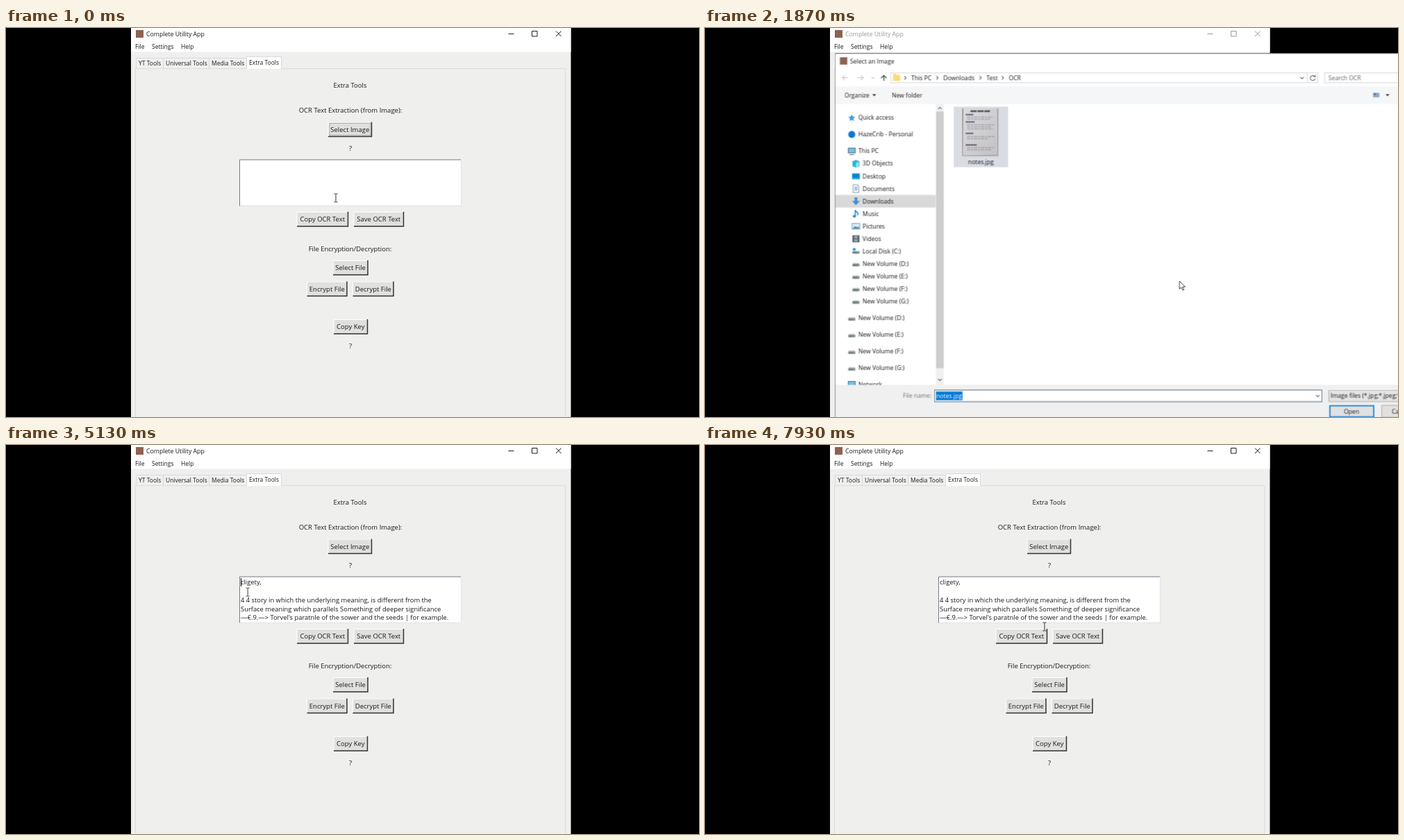
An HTML page that plays this animation: 998 px wide and 561 px high, repeating every 8 s.

```html
<!DOCTYPE html>
<html lang="en">
<head>
<meta charset="utf-8">
<title>Complete Utility App</title>
<style>
  html, body { margin: 0; width: 100%; height: 100%; overflow: hidden; background: #000; }
  svg { display: block; }
  #stage { width: 100%; height: 100%; font-family: "Open Sans", "Noto Sans", sans-serif; }
  text { fill: currentColor; white-space: pre; }
  #stage { color: #1a1a1a; }
  .anim { animation: 8s linear infinite; }
  .step { animation: 8s step-end infinite; }

  #titlebar { animation-name: titlebar; }
  #focusRing { animation-name: ring; }
  #result { animation-name: result; }
  #caret { animation-name: caret; }
  #scroller { animation-name: scroll; }
  #selection { animation-name: select; }
  #dialog { animation-name: dialog; transform-origin: 613px 300px; }
  #picked, #openPressed { animation-name: picked; }
  #openPressed { animation-name: pressed; }
  #pointer { animation-name: pointer; }
  #arrow { animation-name: arrow; }
  #beam { animation-name: beam; }

  @keyframes titlebar { 0%, 34.2%, 100% { color: #1a1a1a } 10.4% { color: #999 } }
  @keyframes ring { 0% { opacity: 1 } 62.5%, 100% { opacity: 0 } }
  @keyframes result { 0% { opacity: 0 } 50%, 100% { opacity: 1 } }
  @keyframes caret { 0%, 66%, 100% { opacity: 0 } 62.5% { opacity: 1 } }
  @keyframes picked { 0%, 36.5%, 100% { opacity: 0 } 14.8% { opacity: 1 } }
  @keyframes pressed { 0%, 36.5%, 100% { opacity: 0 } 28% { opacity: 1 } }
  @keyframes arrow { 0%, 57.7%, 100% { opacity: 0 } 3.9% { opacity: 1 } }
  @keyframes beam { 0%, 57.7%, 100% { opacity: 1 } 3.9% { opacity: 0 } }
  @keyframes scroll {
    0% { transform: none }
    69.5% { transform: translateY(0); animation-timing-function: steps(7) }
    73.5% { transform: translateY(-89.6px) }
    78% { transform: translateY(-89.6px); animation-timing-function: steps(7) }
    82%, 100% { transform: translateY(0) }
  }
  @keyframes select {
    0% { clip-path: inset(0 0 100% 0) }
    65% { clip-path: inset(0 0 100% 0); animation-timing-function: steps(5) }
    69.5% { clip-path: inset(0 0 54.545% 0); animation-timing-function: steps(6) }
    73.5% { clip-path: inset(0 0 0% 0) }
    78% { clip-path: inset(0 0 0% 0); animation-timing-function: steps(6) }
    82% { clip-path: inset(0 0 54.545% 0); animation-timing-function: steps(5) }
    84%, 100% { clip-path: inset(0 0 100% 0) }
  }
  @keyframes dialog {
    0%, 10.2% { opacity: 0; transform: scale(.92) }
    11.625% { opacity: .87; transform: scale(1) }
    12.4%, 34.1% { opacity: 1; transform: scale(1.003) }
    35% { opacity: .62; transform: scale(.99) }
    36%, 100% { opacity: 0; transform: scale(.95) }
  }
  @keyframes pointer {
    0%, 1% { transform: translate(475px, 245px) }
    5% { transform: translate(490px, 170px) }
    6.5%, 8.5% { transform: translate(495px, 147px) }
    11.625% { transform: translate(415px, 140px) }
    14%, 18% { transform: translate(401px, 150px) }
    28% { transform: translate(925px, 549px) }
    35% { transform: translate(925px, 555px) }
    37.5%, 45% { transform: translate(744px, 449px) }
    50% { transform: translate(700px, 420px) }
    60% { transform: translate(352px, 208px) }
    64.125% { transform: translate(348px, 212px) }
    74.125% { transform: translate(471px, 336px) }
    77% { transform: translate(478px, 345px) }
    84%, 89% { transform: translate(472px, 194px) }
    99.125%, 100% { transform: translate(489px, 262px) }
  }
</style>
</head>
<body>
<svg id="stage" viewBox="0 0 998 561" preserveAspectRatio="none">
  <rect width="998" height="561"/>
  <g id="app">
    <rect x="180" width="633.5" height="561" fill="#efefee"/>
    <rect x="180" width="633.5" height="34.5" fill="#fff"/>
    <rect x="187" y="3" width="11" height="11" fill="#8d6251"/>
    <g id="titlebar" class="step" fill="none" stroke-width="1">
      <path d="M723.5 8.5h8M757.5 4.5h7.500v7.500h-7.500zM792 4.500l7.500 7.500m0-7.500l-7.500 7.500" stroke="currentColor"/>
    </g>
    <g id="frame"></g>
    <rect x="336.500" y="190" width="318.500" height="66.500" fill="#fff"/>
    <path d="M336.500 256.500V190H655" fill="none" stroke="#777783"/>
    <path d="M337 256.300H655.500V190.500" fill="none" stroke="#e2e2e2"/>
    <svg x="337" y="191" width="318" height="65">
      <g id="result" class="step">
        <g id="scroller" class="anim">
          <g id="plain"></g>
          <g id="selection" class="anim" color="#fff">
            <rect x="1" y="1" width="316" height="140.800" fill="#0b7bd5"/>
          </g>
        </g>
        <path id="caret" class="step" d="M1.500 1v12" stroke="#000"/>
      </g>
    </svg>
  </g>

  <g id="dialog" class="anim">
    <rect x="188.500" y="37.500" width="860" height="600" fill="#fff" stroke="#777"/>
    <rect x="189" y="85" width="860" height="25" fill="#f5f6f7"/>
    <rect x="189" y="514" width="860" height="120" fill="#f0f0f0"/>
    <rect x="195.500" y="43" width="10.500" height="10.500" fill="#8d6251"/>
    <g fill="none" stroke="#c4c4c4">
      <path d="M207 72.500h-8m3.500-3.500l-3.500 3.500 3.500 3.500M221 72.500h8m-3.500-3.500l3.500 3.500-3.500 3.500M241 71.500l2 2 2-2"/>
      <path d="M258.500 77v-8m-4 4l4-4 4 4" stroke="#444" stroke-width="1.300"/>
      <path d="M268.500 65.500h598v14h-598zM866.500 65.500h15v14h-15zM891.500 65.500h150v14h-150z" stroke="#d9d9d9"/>
      <path d="M856.500 71.500l2.500 2.500 2.500-2.500M877 70.500a3.500 3.500 0 1 0 .8 3M878 68.500v2.500h-2.500" stroke="#555"/>
    </g>
    <path d="M272 67h4l1 1.500h5V77h-10z" fill="#fbd978"/>
    <path d="M961 94h9v6.500h-9z" fill="#8fa9c4"/>
    <path d="M962 95h3v2h-3z" fill="#3d6da0"/>
    <path d="M242 96h5.500l-2.750 3zM979 96h5.500l-2.750 3z" fill="#333"/>
    <rect x="189" y="241" width="144" height="18" fill="#d9d9d9"/>
    <rect x="333.500" y="110" width="11" height="404" fill="#f0f0f0"/>
    <rect x="333.500" y="121" width="11" height="369" fill="#cdcdcd"/>
    <path d="M336.500 117.500l2.500-2.500 2.500 2.500M336.500 505.500l2.500 2.500 2.500-2.500" fill="none" stroke="#555"/>
    <svg width="998" height="514"><g id="places"></g></svg>
    <rect id="picked" class="step" x="359" y="114" width="78" height="87" fill="#d9dce3"/>
    <linearGradient id="paper" x2="1" y2="1"><stop stop-color="#dcdbe0"/><stop offset="1" stop-color="#c3c1c3"/></linearGradient>
    <rect x="371" y="117" width="52" height="68" fill="#a39a92"/>
    <path d="M373 117h48.500l.5 66.500-50 .500z" fill="url(#paper)"/>
    <g fill="none" stroke="#777780">
      <path d="M383 120.500h28" stroke="#34343b" stroke-width="2" stroke-dasharray="9 1"/>
      <path d="M376 125.500h11m-11 10.500h13m-13 16.500h11m-11 16.500h16" stroke="#44444b" stroke-width="1.500"/>
      <path d="M378 129h37m-37 3h33m-33 8h39m-39 3h34m-34 3h37m-37 11h39m-39 3h31m-31 13h38m-38 3h34" stroke-width=".7" stroke-dasharray="5 1 3 1"/>
    </g>
    <rect x="331.500" y="521.500" width="556" height="16.500" fill="#fff" stroke="#0078d7"/>
    <path d="M334.500 525v9" stroke="#222" stroke-width=".8"/>
    <g id="pickedName"></g>
    <path d="M879 528.500l2.500 2.500 2.500-2.500" fill="none" stroke="#555"/>
    <rect x="897.500" y="521.500" width="140" height="16.500" fill="#e4e4e4" stroke="#adadad"/>
    <rect x="899" y="544" width="63" height="16" fill="#e1e1e1" stroke="#0078d7" stroke-width="1.600"/>
    <rect id="openPressed" class="step" x="899.800" y="544.800" width="61.400" height="14.400" fill="#cce4f7"/>
    <rect x="973.500" y="543.500" width="64" height="17" fill="#e1e1e1" stroke="#adadad"/>
    <g id="dialogText"></g>
  </g>

  <g id="pointer" class="anim">
    <path id="arrow" class="step" d="M0 0V11.500L2.700 9l1.800 4.200 1.900-.8L4.600 8.300H8.200Z" fill="#fff" stroke="#111" stroke-width=".8"/>
    <path id="beam" class="step" d="M-2.500-6H-.500L0-5.500.500-6H2.500M0-5.500V5.500M-2.500 6H-.500L0 5.500.500 6H2.500" fill="none" stroke="#333" stroke-width="1"/>
  </g>
</svg>
<script>
  const add = (id, markup) =>
    document.getElementById(id).insertAdjacentHTML('beforeend', markup);
  const escape = s => s.replace(/&/g, '&amp;').replace(/</g, '&lt;').replace(/>/g, '&gt;');

  // y is the middle of the capitals
  const label = (x, y, s, size = 8.6, anchor = 'start') =>
    `<text x="${x}" y="${y + size * .35}" font-size="${size}" text-anchor="${anchor}">${escape(s)}</text>`;
  const centered = (x, y, s) => label(x, y, s, 9.5, 'middle');

  const button = (x, y, w, s) => `
    <rect x="${x}" y="${y}" width="${w}" height="21.500" fill="#e0e0df"/>
    <path d="M${x} ${y + 21}V${y + .5}H${x + w}" fill="none" stroke="#fff"/>
    <path d="M${x} ${y + 21}H${x + w - .5}V${y}" fill="none" stroke="#333" stroke-width="1.500"/>
    ${centered(x + w / 2 - .2, y + 10.8, s)}`;

  const tab = (x, w, s) => `
    <path d="M${x + .5} 58V43.500h${w}V58" fill="#f0f0f0" stroke="#d9d9d9"/>
    ${label(x + 4, 51, s, 8.5)}`;

  add('titlebar', label(202, 8.5, 'Complete Utility App', 8.75));
  add('frame', [
    label(186, 27.5, 'File', 8.5), label(210, 27.5, 'Settings', 8.5), label(252, 27.5, 'Help', 8.5),
    '<path d="M186.500 561V58.500H805.500V561" fill="none" stroke="#dcdcdc"/>',
    tab(187, 39, 'YT Tools'), tab(226, 66, 'Universal Tools'), tab(292, 54, 'Media Tools'),
    '<path d="M346.500 59V41.500h50V59" fill="#fff" stroke="#d9d9d9"/>',
    label(350, 50, 'Extra Tools', 8.5),
    centered(495.500, 83, 'Extra Tools'),
    centered(496, 119, 'OCR Text Extraction (from Image):'),
    button(464, 135.500, 63, 'Select Image'),
    '<rect id="focusRing" class="step" x="466" y="137.500" width="59" height="17" fill="none" stroke="#666" stroke-width=".8" stroke-dasharray="1 1"/>',
    centered(496, 174, '?'),
    button(419, 265, 74, 'Copy OCR Text'), button(501, 265, 72, 'Save OCR Text'),
    centered(495.500, 319, 'File Encryption/Decryption:'),
    button(471, 335, 50.500, 'Select File'),
    button(433.500, 365.500, 58, 'Encrypt File'), button(499.500, 365.500, 59, 'Decrypt File'),
    button(472, 420, 49, 'Copy Key'),
    centered(496, 459, '?')
  ].join(''));

  const lines = [
    'cligety,', '',
    '4 4 story in which the underlying meaning, is different from the',
    'Surface meaning which parallels Something of deeper significance',
    '—€.9.—> Torvel\'s paratnle of the sower and the seeds | for example.',
    '', 'Analogy,', '',
    'by clrawing, a_comparison between two enings tho:',
    'Something in common but are otherwise dlissimila'
  ].map((s, i) => label(1, 7 + i * 12.8, s, 9.4)).join('');
  add('plain', lines);
  add('selection', lines);

  // Icons are drawn around their own centre
  const icons = {
    star: '<path d="M0-5l1.500 3.300 3.500.400-2.600 2.400.700 3.600L0 2.900l-3.100 1.800.700-3.600L-5-1.300l3.500-.400z" fill="#3c9be0"/>',
    cloud: '<circle r="5" fill="#1178cf"/>',
    pc: '<path d="M-5-4.500H5V2.500H-5z" fill="#6fc3ee" stroke="#5b6670"/><path d="M-3 5H3" stroke="#5b6670"/>',
    cube: '<path d="M0-5.500l5 2v7l-5 2-5-2v-7z" fill="#27b4d3"/><path d="M0-1v6l4-1.700v-6z" fill="#9fe4f1"/>',
    desk: '<path d="M-5.500-4h11v8.500h-11z" fill="#0f83cf"/><path d="M-5.500 2.500h11v2h-11z" fill="#35b3ee"/>',
    page: '<path d="M-4-5.500h6l2 2v9h-8z" fill="#fff" stroke="#8b98a3"/><path d="M-2-2h4M-2 0h4M-2 2h4" stroke="#3c8ecb"/>',
    down: '<path d="M-2-5.500h4v5h3.500L0 5.500-5.500-.500H-2z" fill="#3d91d6"/>',
    note: '<path d="M-1 3.500v-9q1 3 4 4.500 0 2-1 3" fill="none" stroke="#1685d8" stroke-width="1.500"/><circle cx="-2.300" cy="3.500" r="2" fill="#1685d8"/>',
    photo: '<path d="M-5.500-4h11v8h-11z" fill="#dff1fb" stroke="#8796a2"/><path d="M-5 3.500l4-4 2 2 2-1.500 2 3.500z" fill="#3a96b8"/>',
    film: '<path d="M-5-5H5V5H-5z" fill="#555a61"/><path d="M-2.500-4h5v3.500h-5zM-2.500.500h5V4h-5z" fill="#8faabd"/>',
    disk: '<path d="M-5 0H5V3.500H-5z" fill="#777e84"/><path d="M-4-1.500H4L5 0H-5z" fill="#c4c8cb"/><path d="M2 2h2" stroke="#6fe06f"/>',
    system: '<path d="M-5 0H5V3.500H-5z" fill="#777e84"/><path d="M-4.500-4.500h4v3.500h-4z" fill="#24a0e6"/><path d="M2 2h2" stroke="#6fe06f"/>'
  };
  const place = (x, y, icon, s) =>
    `<g transform="translate(${x - 9.500} ${y})">${icons[icon]}</g>${label(x, y, s)}`;

  const volumes = ['D', 'E', 'F', 'G'].map(d => ['disk', `New Volume (${d}:)`]);
  const folders = [
    ['cube', '3D Objects'], ['desk', 'Desktop'], ['page', 'Documents'], ['down', 'Downloads'],
    ['note', 'Music'], ['photo', 'Pictures'], ['film', 'Videos'], ['system', 'Local Disk (C:)'],
    ...volumes
  ];
  add('places', [
    place(222, 130, 'star', 'Quick access'),
    place(222, 154, 'cloud', 'HazeCrib - Personal'),
    place(222, 178, 'pc', 'This PC'),
    ...folders.map(([icon, s], i) => place(228, 196 + i * 18, icon, s)),
    ...volumes.map(([icon, s], i) => place(222, 418 + i * 24, icon, s)),
    place(222, 513.500, 'pc', 'Network')
  ].join(''));

  add('dialogText', [
    label(210, 48.500, 'Select an Image', 8.7),
    ...[[298, 'This PC'], [344, 'Downloads'], [406, 'Test'], [438, 'OCR']].map(([x, s]) =>
      `<path d="M${x - 10} 70l2.500 2.500-2.500 2.500" fill="none" stroke="#555"/>${label(x, 72.500, s)}`),
    `<g color="#666">${label(897, 72.500, 'Search OCR')}</g>`,
    label(202, 97.500, 'Organize'), label(270, 97.500, 'New folder'),
    label(398, 193.500, 'notes.jpg', 8.6, 'middle'),
    `<g color="#777">${label(286, 529.500, 'File name:')}</g>`,
    label(900, 529.500, 'Image files (*.jpg;*.jpeg;*.png)'),
    label(930, 552, 'Open', 8.6, 'middle'), label(988, 552, 'Cancel')
  ].join(''));

  add('pickedName', `<g class="step" style="animation-name:picked">
    <rect x="331.500" y="521.500" width="556" height="16.500" fill="#fff" stroke="#8a8a8a"/>
    <rect x="333.500" y="523.500" width="38" height="12.500" fill="#0078d7"/>
    <g color="#fff">${label(334, 529.500, 'notes.jpg')}</g></g>`);
</script>
</body>
</html>
```
